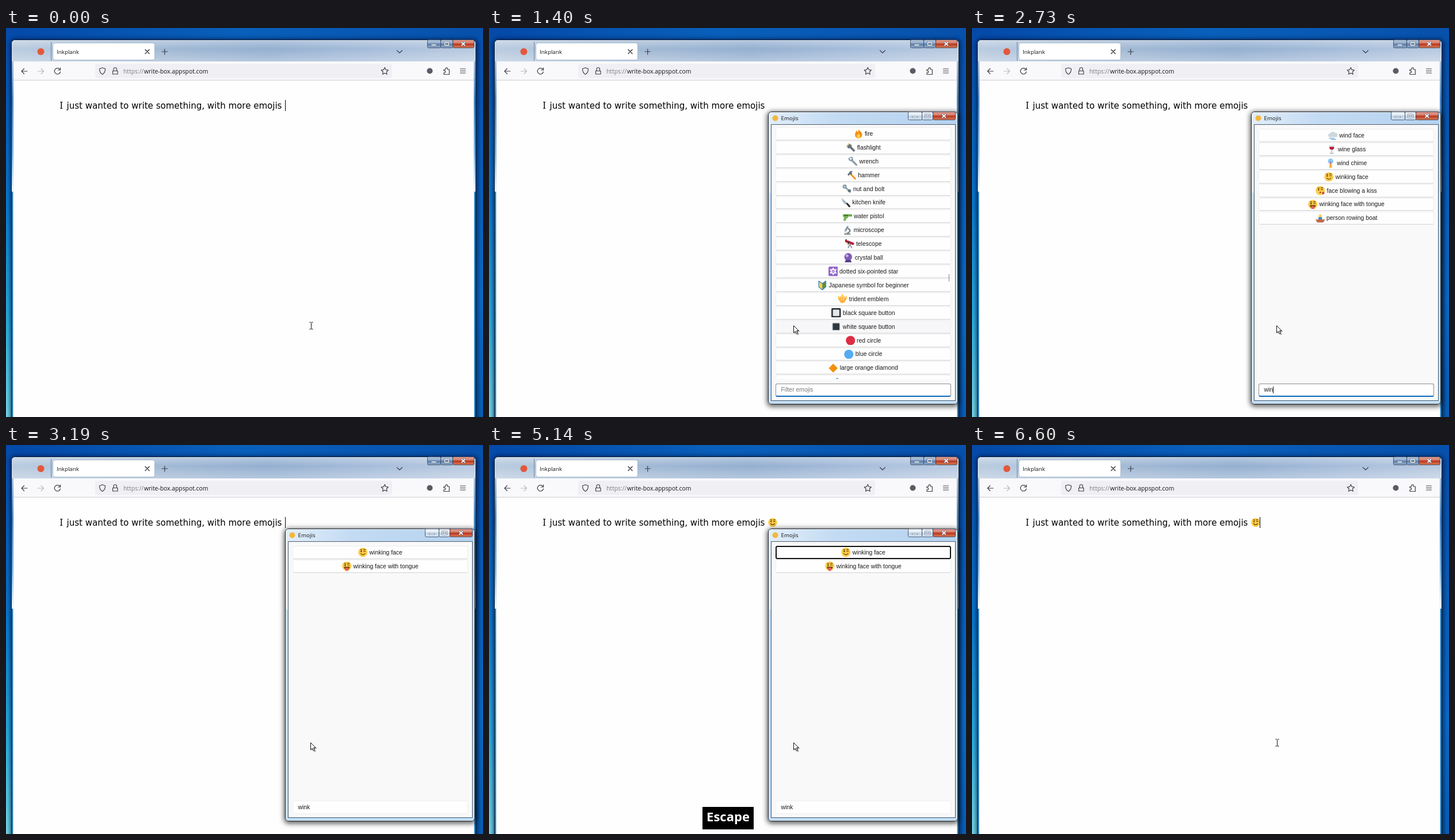
Animation of 829 by 675 pixels, one loop 6860 ms. Source, as an HTML page:

```html
<!DOCTYPE html>
<html lang="en">
<head>
<meta charset="utf-8">
<title>Emoji picker</title>
<style>
html, body { margin: 0; width: 100%; height: 100%; overflow: hidden; background: #0a55b0; }
#stage { position: relative; width: 829px; height: 675px; overflow: hidden; }
#stage > svg { position: absolute; left: 0; top: 0; }
.ui { font-family: "Open Sans", "Noto Sans", sans-serif; }
#pop { position: absolute; left: 0; top: 0; width: 330px; height: 508px; transform-origin: 0 0;
  border-radius: 6px; box-shadow: 0 2px 9px 2px rgba(0,0,0,.62);
  font: 10.4px "Liberation Sans", Arial, sans-serif; color: #1b1b1b; }
#pop > svg { position: absolute; left: 0; top: 0; }
.list { position: absolute; left: 13px; top: 24px; width: 305px; height: 440px; overflow: hidden; }
.row { box-sizing: border-box; height: 22.92px; margin-bottom: 1px; display: flex; align-items: center;
  justify-content: center; background: #fefefe; border: 1px solid #ededed; border-bottom-color: #d2d2d2;
  border-radius: 3px; white-space: nowrap; }
.row svg { width: 16.5px; height: 16.5px; margin-right: 2.9px; }
.row.hover { background: #f7f7f9; }
.ring .row:first-child { border: 2px solid #111; }
.thumb { position: absolute; right: 3px; width: 1.5px; background: #858585; }
#box { box-sizing: border-box; position: absolute; left: 13px; top: 471.5px; width: 305px; height: 23.5px;
  padding-left: 8.5px; display: flex; align-items: center; background: #fefefe;
  border: 1px solid #eee; border-radius: 3px; }
#box.focus { border-color: #8c8c8c; border-bottom: 2px solid #0b67b8; background: #fff; }
#box.empty span { color: #7a7a7a; }
#box i { width: 1px; height: 12px; background: #111; }
#box.empty i { position: absolute; left: 8px; }
</style>
</head>
<body>
<div id="stage">
<svg width="829" height="675" viewBox="0 0 829 675">
  <defs>
    <linearGradient id="sky"><stop offset="0" stop-color="#0449a8"/><stop offset=".5" stop-color="#0960bb"/><stop offset="1" stop-color="#0750ab"/></linearGradient>
    <linearGradient id="west" x2="0" y2="1"><stop offset="0" stop-color="#0549a8"/><stop offset=".45" stop-color="#0b7ad2"/><stop offset=".75" stop-color="#2bb0e4"/><stop offset="1" stop-color="#74d9ea"/></linearGradient>
    <linearGradient id="east" x2="0" y2="1"><stop offset="0" stop-color="#0750ab"/><stop offset=".7" stop-color="#0b6cc8"/><stop offset="1" stop-color="#0860b8"/></linearGradient>
    <linearGradient id="glass"><stop offset="0" stop-color="#b9cbdf"/><stop offset=".3" stop-color="#a3bad5"/><stop offset=".55" stop-color="#94afd0"/><stop offset=".8" stop-color="#a8bedb"/><stop offset="1" stop-color="#b9cae0"/></linearGradient>
    <linearGradient id="gloss" x2="0" y2="1"><stop offset="0" stop-color="#fff" stop-opacity=".3"/><stop offset=".4" stop-color="#fff" stop-opacity="0"/><stop offset="1" stop-color="#fff" stop-opacity=".3"/></linearGradient>
    <linearGradient id="edge" x2="0" y2="1"><stop offset="0" stop-color="#a5bcd8"/><stop offset=".3" stop-color="#4b83bb"/><stop offset=".7" stop-color="#7eb2dc"/><stop offset="1" stop-color="#f0f8fd"/></linearGradient>
    <linearGradient id="steel" x2="0" y2="1"><stop offset="0" stop-color="#b3c6de"/><stop offset=".48" stop-color="#8ea9cb"/><stop offset=".5" stop-color="#5f7fa9"/><stop offset="1" stop-color="#8eabcd"/></linearGradient>
    <linearGradient id="pale" x2="0" y2="1"><stop offset="0" stop-color="#f1f6fb"/><stop offset=".48" stop-color="#dde8f3"/><stop offset=".5" stop-color="#bfd1e4"/><stop offset="1" stop-color="#d4e5f5"/></linearGradient>
    <linearGradient id="red" x2="0" y2="1"><stop offset="0" stop-color="#e2a195"/><stop offset=".48" stop-color="#d07462"/><stop offset=".5" stop-color="#b9361f"/><stop offset="1" stop-color="#d77a55"/></linearGradient>
    <linearGradient id="cap"><stop offset="0" stop-color="#e2eefa"/><stop offset=".35" stop-color="#c3dbf3"/><stop offset="1" stop-color="#b5d2ef"/></linearGradient>
    <filter id="soft" x="-5%" y="-5%" width="110%" height="110%"><feGaussianBlur stdDeviation="4"/></filter>
  </defs>
  <rect width="829" height="675" fill="url(#sky)"/>
  <rect width="12" height="675" fill="url(#west)"/>
  <rect x="814" width="15" height="675" fill="url(#east)"/>
  <rect x="8" y="20" width="811" height="680" rx="6" fill="#001025" opacity=".75" filter="url(#soft)"/>
  <rect x="9.5" y="20.5" width="807" height="680" rx="6" fill="url(#glass)" stroke="#0a1c33"/>
  <rect x="10.5" y="21.5" width="805" height="37" rx="5" fill="url(#gloss)" stroke="#e4eef8" stroke-opacity=".6"/>
  <g id="sides"></g>
  <rect x="13" y="58" width="800" height="33" fill="#f9f9fb"/>
  <rect x="13" y="91" width="800" height="584" fill="#fefefe"/>
  <path d="M13 90.500H813" stroke="#cfcfd6"/>
  <path d="M78.500 24V57" stroke="#71859f"/>
  <circle cx="60.500" cy="41" r="6" fill="#e3573b"/>
  <rect x="81.500" y="26" width="177" height="29.500" rx="3.500" fill="#fff" stroke="#8399b5" stroke-opacity=".6"/>
  <rect x="155" y="62" width="516" height="25" rx="4" fill="#f0f0f4"/>
  <g class="ui">
    <text x="88" y="45" font-size="9.800" fill="#15141a">Inkplank</text>
    <text x="204" y="79" font-size="10.350"><tspan fill="#7b7b85">https://</tspan><tspan x="240" fill="#15141a">write-box.appspot.com</tspan></text>
  </g>
  <g fill="none" stroke="#3f3f49" stroke-width="1.200" stroke-linecap="round" stroke-linejoin="round">
    <path d="M242 37.500l7 7m0-7l-7 7" stroke="#222"/>
    <path d="M271 41h9.500M275.750 36.500v9.500M679.500 39l4.500 4.300 4.500-4.300"/>
    <path d="M37 75H27m4.500-4.500L27 75l4.500 4.500"/>
    <path d="M55.500 75h10m-4.500-4.500l4.500 4.500-4.500 4.500" stroke="#b9b9c0"/>
    <path d="M93.500 71.500a5.200 5.200 0 1 0 1 4.500M94.500 69v4h-4"/>
    <path d="M167.500 69l5 1.800c0 5-1.500 8-5 9.700-3.500-1.700-5-4.700-5-9.700z"/>
    <path d="M185.500 74.500h8.500v5.500h-8.500zM187 74.500v-3a2.700 2.700 0 0 1 5.500 0v3"/>
    <path d="M658.300 68.500l1.900 3.900 4.200.6-3 3 .7 4.300-3.800-2-3.800 2 .7-4.300-3-3 4.200-.6z"/>
    <path d="M761 72h3v-1.500a1.700 1.700 0 0 1 3.400 0V72h3v8.500H761v-3h1.300a1.600 1.600 0 0 0 0-3.200H761z"/>
    <path d="M789.500 71h9M789.500 74.500h9M789.500 78h9"/>
  </g>
  <circle cx="736.500" cy="74.500" r="5" fill="#5b5b66"/>
  <g id="buttons"></g>
  <text x="93.500" y="140" font-size="16" font-family="'Noto Sans', sans-serif">I</text>
  <text x="105.500" y="140" font-size="15.040" font-family="'DejaVu Sans', Verdana, sans-serif">just wanted to write something, with more emojis</text>
  <g id="typed"></g>
  <rect id="caret" y="125" width="1" height="19"/>
</svg>
<div id="pop"></div>
<svg width="829" height="675" viewBox="0 0 829 675">
  <g id="label" class="ui">
    <rect/>
    <text x="415.500" text-anchor="middle" font-size="22" font-weight="700" fill="#fff"></text>
  </g>
  <path id="beam" d="M527.500 510.500h2l1 1 1-1h2M530.500 511.500v11M527.500 522.500h2l1-1 1 1h2" fill="none" stroke="#111"/>
  <g id="arrow">
    <path d="M531 518v13l3-3 2 5 3-1-2-5h4z" opacity=".25"/>
    <path d="M529.500 516.500v12.500l2.900-2.700 2 4.500 2.100-.9-2-4.400h3.800z" fill="#fff" stroke="#111"/>
  </g>
</svg>
</div>
<script>
const $ = id => document.getElementById(id);
const LOOP = 6860;

// Icon helpers, all on a 16 x 16 grid
const fill = (d, c) => `<path d="${d}" fill="${c}"/>`;
const line = (d, c, w = 1) => `<path d="${d}" fill="none" stroke="${c}" stroke-width="${w}" stroke-linecap="round" stroke-linejoin="round"/>`;
const disc = (x, y, r, c) => `<circle cx="${x}" cy="${y}" r="${r}" fill="${c}"/>`;
const box = (m, c, r = 1) => `<rect x="${m}" y="${m}" width="${16 - 2 * m}" height="${16 - 2 * m}" rx="${r}" fill="${c}"/>`;
const tile = (d, w = 2) => box(0, '#3b88c3', 2) + line(d, '#fff', w);
const face = more => disc(8, 8, 7.8, '#ffcc4d') + more;
const eye = x => `<ellipse cx="${x}" cy="6.300" rx="1.100" ry="1.600" fill="#664500"/>`;
const smile = line('M4.500 10q3.500 4 7 0', '#664500', 1.2);
const eyes = eye(5.2) + eye(10.8);
const wink = eye(5.2) + line('M9.300 6.500q1.500-1.300 3 0M9 3.800q1.500-1.300 3.500-.3M3.800 3.500q1.500-.8 2.500.3', '#664500', 1.1);
const cloud = more => fill('M3 11a3 3 0 0 1 0-6 5 4.500 0 0 1 9-1 3.500 3.500 0 0 1 1 7z', '#ccd6dd') + more;
const rain = line('M4 12l-1 3m5-3l-1 3m5-3l-1 3', '#5dadec', 1.3);
const bolt = fill('M8 9l-2 4h2l-1 3 4-5H9l1-2z', '#f4900c');

const icons = {
  'fire': fill('M8 0C9 4 14 5 14 10a6 6 0 0 1-12 0C2 7 4 6 4 3c2 1 2 2 2 3C8 5 8 3 8 0z', '#f4900c') + fill('M8 7c0 2 3 3 3 5.500a3 3.500 0 0 1-6 0C5 10 8 9 8 7z', '#ffcc4d'),
  'flashlight': fill('M1 5l4-4 5 3v3l6 6-2.500 2.500-6-6H4z', '#66757f') + fill('M1 5l4-4 1.500 1L2 6.500z', '#ffd983') + disc(10, 9.5, 1, '#be1931'),
  'wrench': line('M6 6l8 8', '#8899a6', 3) + line('M2 2.500v3L5 7l2.500-2L7 2 4.500 1.500', '#8899a6', 2),
  'hammer': line('M6 6l8 8', '#f4900c', 2.6) + fill('M1 7l5-6 4 .5-2 2 1 2-2 2-2-1-2 3z', '#66757f'),
  'nut and bolt': line('M3 3l10 10', '#99aab5', 3) + disc(4, 4, 3.4, '#8899a6') + disc(4, 4, 1.4, '#ccd6dd') + disc(12, 11, 2.6, '#66757f'),
  'kitchen knife': fill('M1 0l9 8-3 3C3 8 1 4 1 0z', '#aab8c2') + line('M10 9.500l4 4.500', '#292f33', 3),
  'water pistol': fill('M0 4h15l1 4H9l-1 3H6l-1 4H1l1-6-2-1z', '#77b255') + fill('M2 5h7v2H2z', '#3e721d') + line('M11 5.500h4', '#5c913b'),
  'microscope': line('M4 14h9M9 12c5-1 5-6 1-7', '#66757f', 2) + line('M9 2L5.500 8', '#8899a6', 3) + line('M3 11h6', '#ccd6dd', 1.5),
  'telescope': line('M2 4l11 4', '#be1931', 4) + line('M0 3l2-2M6 5l-1 4', '#292f33', 1.5) + line('M8 9l-3 6m3-6l3 6', '#66757f', 1.4),
  'crystal ball': disc(8, 7, 6.5, '#7f5cb5') + disc(6, 5, 2.4, '#c5a9e8') + fill('M4 12h8l2 4H2z', '#553788'),
  'dotted six-pointed star': box(0, '#9266cc', 2) + line('M8 2.500L13 11H3zM8 13.500L3 5h10z', '#fff', 1.3) + disc(8, 8, 1, '#fff'),
  'Japanese symbol for beginner': fill('M2 1l6 4v11L2 11z', '#ffcc4d') + fill('M14 1L8 5v11l6-5z', '#5c913b') + line('M2 1l6 4 6-4v10l-6 5-6-5z', '#3b88c3', 1.2),
  'trident emblem': line('M8 1v13M2 5c-1 9 13 9 12 0M5 13h6M5 5v4m6-4v4', '#ffac33', 2.2) + fill('M8 0l3 4H5zM2 2l2 4H0zM14 2l2 4h-4z', '#ffcc4d'),
  'black square button': box(0, '#31373d', 2) + box(2.6, '#e6e7e8', 1),
  'white square button': box(1, '#ccd6dd', 2) + box(2.4, '#31373d', 1),
  'red circle': disc(8, 8, 7.8, '#dd2e44'),
  'blue circle': disc(8, 8, 7.8, '#55acee'),
  'large orange diamond': fill('M8 .5L15.500 8 8 15.500.5 8z', '#f4900c'),
  'large blue diamond': fill('M8 .5L15.500 8 8 15.500.5 8z', '#55acee'),
  'left-right arrow': tile('M3 8h10M5.500 5L3 8l2.500 3m5-6L13 8l-2.500 3'),
  'up-down arrow': tile('M8 3v10M5 5.500L8 3l3 2.500m-6 5L8 13l3-2.500'),
  'up-left arrow': tile('M4.500 4.500l7 7M4.500 10V4.500H10', 2.4),
  'up-right arrow': tile('M11.500 4.500l-7 7M11.500 10V4.500H6', 2.4),
  'down-right arrow': tile('M4.500 4.500l7 7M11.500 6v5.500H6', 2.4),
  'down-left arrow': tile('M11.500 4.500l-7 7M4.500 6v5.500H10', 2.4),
  'right arrow curving left': tile('M4 4h5a3.500 3.500 0 0 1 0 7.500H4M6.500 9L4 11.500 6.500 14', 1.8),
  'left arrow curving right': tile('M12 4H7a3.500 3.500 0 0 0 0 7.500h5M9.500 9l2.500 2.500L9.500 14', 1.8),
  'watch': fill('M5.500 0h5l.5 16H5z', '#66757f') + disc(8, 8, 4.8, '#31373d') + disc(8, 8, 3.6, '#f5f8fa') + line('M8 5.500V8l1.500 1', '#31373d', .8),
  'fast-forward button': box(0, '#3b88c3', 2) + fill('M2.500 3.500L8 8l-5.500 4.500zM8 3.500L13.500 8 8 12.500z', '#fff'),
  'fast down button': box(0, '#3b88c3', 2) + fill('M3.500 2.500L8 8l4.500-5.500zM3.500 8L8 13.500 12.500 8z', '#fff'),
  'stopwatch': disc(8, 9, 6.6, '#66757f') + disc(8, 9, 5, '#f5f8fa') + line('M8 9l3-3M6.500 1h3M13 2.500l1 1', '#66757f', 1.4),
  'white small square': box(5, '#e6e7e8'),
  'white medium square': box(1.5, '#e6e7e8'),
  'white medium-small square': box(3.5, '#e1e4e6'),
  'snowman': disc(8, 12, 4, '#e1e8ed') + disc(8, 6, 3.2, '#e1e8ed') + fill('M5.500 0h5v3h2v1h-9V3h2z', '#292f33') + line('M5.500 8.500h5M9 9v3', '#dd2e44', 1.6) + [[2, 2], [14, 3], [1, 9], [15, 10]].map(p => disc(...p, .8, '#b8c5ce')).join(''),
  'check box with check': box(0, '#226699', 2) + line('M3.500 8.500l3 3.500 6-8', '#fff', 2),
  'umbrella with rain drops': fill('M0 9a8 7 0 0 1 16 0l-3-1-2.500 1L8 8 5.500 9 3 8z', '#7450a8') + line('M8 8v5.500a1.500 1.500 0 0 1-3 0', '#66757f', 1.2) + line('M2 2L1 4m13-3l1 2', '#5dadec'),
  'wheel of dharma': box(0, '#9266cc', 2) + disc(8, 8, 4.5, '#fff'),
  'cloud with lightning and rain': cloud(rain + bolt),
  'sun with face': disc(8, 8, 7.8, '#ffac33') + disc(8, 8, 5.6, '#ffd983') + eyes + smile,
  'full moon with face': disc(8, 8, 7.8, '#ffd983') + eyes + smile,
  'cloud with rain': cloud(rain),
  'cloud with snow': cloud(disc(4, 13, 1, '#88c9f9') + disc(8, 14, 1, '#88c9f9') + disc(12, 13, 1, '#88c9f9')),
  'cloud with lightning': cloud(bolt),
  'wind face': cloud(line('M2 13h8m-5 2h8', '#5dadec', 1.2)),
  'wine glass': fill('M4 1h8c1 5-1 8-4 8S3 6 4 1z', '#dbe5ec') + fill('M4 4h8c0 3-1 5-4 5S4 7 4 4z', '#be1931') + line('M8 9v5.500M5 15h6', '#aab8c2', 1.3),
  'fork and knife with plate': disc(8, 8, 5, '#ccd6dd') + line('M1.500 2v12M14.500 2v12', '#8899a6', 1.8),
  'bottle with popping cork': fill('M6 4h4v3l2 3v6H4v-6l2-3z', '#3e721d') + disc(8, 2, 1.8, '#d99e82'),
  'wind chime': disc(8, 5, 4.5, '#88c9f9') + line('M8 6v5', '#dd2e44') + fill('M6 10h4v6H6z', '#ffac33'),
  'house with garden': fill('M1 8l6-6 6 6v7H1z', '#ffe8b6') + line('M1 8l6-6 6 6', '#a0041e', 2) + disc(13, 12, 3, '#5c913b'),
  'envelope with arrow': fill('M0 3h16v11H0z', '#ccd6dd') + line('M1 4l7 5 7-5', '#8899a6') + line('M8 15V8m-3 3l3-3 3 3', '#dd2e44', 1.6),
  'locked with key': line('M5 8V4a3 3 0 0 1 6 0v4', '#aab8c2', 2) + fill('M2 7h12v9H2z', '#ffac33'),
  'grinning face with smiling eyes': face(line('M3.500 6.500q1.500-2 3 0m3 0q1.500-2 3 0', '#664500', 1.2) + fill('M3.500 9h9q-1 5-4.500 5T3.500 9z', '#664500')),
  'face with tears of joy': face(eyes + fill('M3.500 9h9q-1 5-4.500 5T3.500 9z', '#664500') + disc(2, 9, 2, '#5dadec') + disc(14, 9, 2, '#5dadec')),
  'winking face': face(wink + smile),
  'face blowing a kiss': face(wink + disc(8, 11, 1.2, '#664500') + disc(13, 12, 2, '#dd2e44')),
  'winking face with tongue': face(wink + fill('M3 9h10q-1 5-5 5T3 9z', '#664500') + fill('M5.500 10.500h5v3a2.500 2.500 0 0 1-5 0z', '#e8596e')),
  'person rowing boat': disc(8, 4, 2.5, '#ffcc4d') + fill('M5 6h6v5H5z', '#3b88c3') + fill('M0 10h16l-3 5H3z', '#c1694f'),
};
const names = Object.keys(icons);
const span = (from, to) => names.slice(names.indexOf(from), names.indexOf(to) + 1);

// key: [rows, top offset, thumb top, thumb height]
const lists = {
  all: [span('fire', 'large blue diamond'), 3, 258, 13],
  w: [span('left-right arrow', 'wheel of dharma'), 6, 18, 17],
  wi: [['check box with check', 'umbrella with rain drops', ...span('cloud with lightning and rain', 'winking face')], 6, 18, 60],
  win: [['wind face', 'wine glass', 'wind chime', ...span('winking face', 'person rowing boat')], 6],
  wink: [['winking face', 'winking face with tongue'], 6],
};
const row = name => `<div class="row${name === 'white square button' ? ' hover' : ''}"><svg viewBox="0 0 16 16">${icons[name]}</svg>${name}</div>`;
const listHTML = ([rows, top, y, h]) => `<div style="padding-top:${top}px"><div class="rows">${rows.map(row).join('')}</div></div>`
  + (h ? `<div class="thumb" style="top:${y}px;height:${h}px"></div>` : '');

// Minimise, maximise and close, with x at the left edge of the group
function winButtons(x, y, w1, w2, w3, skin) {
  const b = (bx, w, f, cls) => `<rect class="${cls}" x="${bx + .5}" y="${y + .5}" width="${w}" height="14" rx="2" fill="url(#${f})" stroke="#30415a" stroke-opacity=".8"/>`;
  const x2 = x + w1, x3 = x2 + w2, c = x3 + w3 / 2, m = x2 + w2 / 2;
  const glyph = (d, w) => line(d, '#46536a', w + 1.2) + line(d, '#fff', w);
  return b(x, w1, skin, '') + b(x2, w2, skin, '') + b(x3, w3, 'red', 'close')
    + glyph(`M${x + w1 / 2 - 3.5} ${y + 9.5}h7`, 1.8) + glyph(`M${m - 3} ${y + 5}h7v5h-7z`, 1.4)
    + glyph(`M${c - 2.5} ${y + 5}l5.500 5m0-5l-5.500 5`, 1.7);
}

$('sides').innerHTML = [10, 813].map(x =>
  `<rect x="${x}" y="58" width="3" height="226" fill="url(#edge)"/><rect x="${x}" y="284" width="3" height="391" fill="#2c78b5"/>`
).join('') + '<path d="M12.500 284V675M813.500 284V675" stroke="#a9d4ee"/>';
$('buttons').innerHTML = winButtons(732, 20, 23, 21, 37, 'steel');
$('typed').innerHTML = `<g transform="translate(485 126.500)">${icons['winking face']}</g>`;
$('pop').innerHTML = `<svg width="330" height="508">
  <rect x=".5" y=".5" width="329" height="507" rx="5.500" fill="#bedcf8" stroke="#16202c"/>
  <rect x="1.500" y="1.500" width="327" height="140" rx="4.500" fill="url(#cap)"/>
  <rect x="1.500" y="1.500" width="327" height="505" rx="4.500" fill="none" stroke="#fff" stroke-opacity=".75"/>
  <rect x="5.500" y="22.500" width="320" height="479" fill="#f9f9f9" stroke="#4d5e70"/>
  <circle cx="12.500" cy="11.500" r="5" fill="#f3b73c"/>
  <text class="ui" x="22.500" y="15" font-size="9.800" fill="#111">Emojis</text>
  ${winButtons(243, 0, 24, 19, 39, 'pale')}</svg>
  <div class="list"></div><div id="box"><span></span><i></i></div>`;
const listEl = document.querySelector('.list'), boxText = document.querySelector('#box span'), boxCaret = document.querySelector('#box i');
const closeRect = document.querySelector('#pop .close');

// Maps the w x h popup onto four corners: tl, tr, br, bl
function quad(w, h, [[x0, y0], [x1, y1], [x2, y2], [x3, y3]]) {
  const ax = x1 - x2, bx = x3 - x2, sx = x0 - x1 + x2 - x3;
  const ay = y1 - y2, by = y3 - y2, sy = y0 - y1 + y2 - y3;
  const d = ax * by - bx * ay, g = (sx * by - bx * sy) / d, k = (ax * sy - sx * ay) / d;
  return `matrix3d(${[(x1 - x0 + g * x1) / w, (y1 - y0 + g * y1) / w, 0, g / w,
    (x3 - x0 + k * x3) / h, (y3 - y0 + k * y3) / h, 0, k / h, 0, 0, 1, 0, x0, y0, 0, 1].map(v => v.toFixed(8))})`;
}
const flat = [[485, 145], [815, 145], [815, 653], [485, 653]];
const tilt = [[493, 158], [804.5, 161.5], [811, 645.5], [487, 649.5]];
const pose = k => flat.map((p, i) => p.map((v, j) => v + (tilt[i][j] - v) * k));

// Step tables: [time, value]
const blink = [270, 800, 1400, 1860, 2390, 2920, 3460, 3990, 4470, 4740, 5000, 5530, 6060, 6600];
const popup = [[0, null], [860, [.9, .4]], [930, [.35, .85]], [990, [0, 1]], [5200, [.45, .85]], [5270, [1, .53]], [5330, null]];
const labels = [[0, null], [800, ['Ctrl + Alt + E', 156]], [1400, null], [3650, ['Tab', 55]], [4270, null],
  [4670, ['Enter', 73]], [5140, ['Escape', 89]], [5800, null]];
const query = [[0, ''], [2390, 'w'], [2590, 'wi'], [2730, 'win'], [2860, 'wink']];
const shown = [[0, 'all'], [2520, 'w'], [2590, 'wi'], [2730, 'win'], [2860, 'wink']];
const boxBlink = [[0, true], [1130, false], [1660, true], [2130, false], [2390, true], [3190, false]];
const at = (steps, t) => steps.filter(s => s[0] <= t).pop()[1];
const show = (el, on) => { el.style.display = on ? '' : 'none'; };

let current;
function draw(t) {
  const done = t >= 4740;
  show($('caret'), blink.filter(b => b <= t).length % 2 === 0);
  $('caret').setAttribute('x', done ? 500 : 485);
  show($('typed'), done);

  const arrow = t >= 930 && t < 5200;
  show($('arrow'), arrow);
  show($('beam'), !arrow);

  const win = at(popup, t);
  show($('pop'), win);
  if (win) {
    $('pop').style.transform = quad(330, 508, pose(win[0]));
    $('pop').style.opacity = win[1];
    closeRect.setAttribute('fill', t >= 5200 ? 'url(#pale)' : 'url(#red)');
  }

  const key = at(shown, t), text = at(query, t);
  if (key !== current) listEl.innerHTML = listHTML(lists[current = key]);
  listEl.classList.toggle('ring', t >= 3990);
  boxText.textContent = text || 'Filter emojis';
  $('box').className = (t < 3190 ? 'focus' : '') + (text ? '' : ' empty');
  show(boxCaret, at(boxBlink, t));

  const label = at(labels, t);
  show($('label'), label);
  if (label) {
    const [word, w] = label, low = /[gpy]/.test(word);
    const [rect, txt] = $('label').children;
    const top = low ? 628 : 632;
    Object.entries({ x: 415.5 - w / 2, y: top, width: w, height: 667 - top }).forEach(a => rect.setAttribute(...a));
    txt.setAttribute('y', low ? 653 : 657);
    txt.textContent = word;
  }
}

const start = performance.now();
function tick() {
  draw((performance.now() - start) % LOOP);
  requestAnimationFrame(tick);
}
tick();
</script>
</body>
</html>
```
